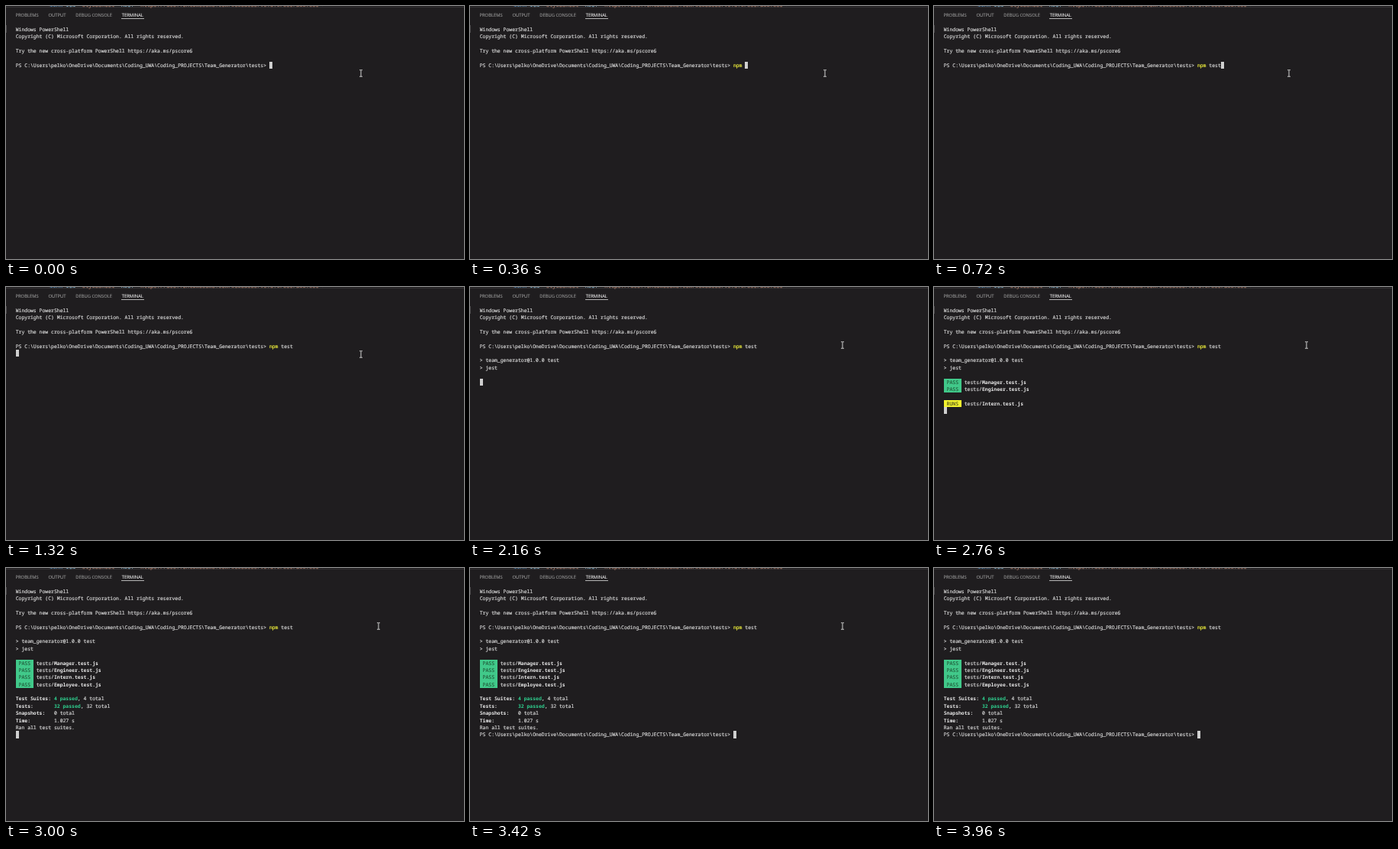
Write an HTML page that moves like this. It is 600 by 331 pixels and loops after 4200 ms.

```html
<!DOCTYPE html>
<html lang="en">
<head>
<meta charset="utf-8">
<title>Terminal test run</title>
<style>
  html, body { margin: 0; width: 100%; height: 100%; overflow: hidden; background: #1f1d1f; }
  #stage { position: relative; width: 600px; height: 331px; overflow: hidden; text-rendering: geometricPrecision; }
  #stage > * { position: absolute; }
  pre {
    margin: 0; color: #d2d2d2; white-space: pre;
    font: 6.443px/9.375px "Noto Sans Mono", monospace; font-variant-ligatures: none;
    -webkit-text-stroke: .2px;
  }
  #code { left: 53px; top: -5.4px; color: #808080; font-size: 7.08px; opacity: .75; }
  #code i { font-style: normal; color: #9cdcfe; }
  #code b { font-weight: 400; color: #569cd6; }
  #code s { text-decoration: none; color: #ce9178; }
  #border { left: 0; top: 1px; width: 600px; height: 1px; background: #333133; }
  #mark { left: 0; top: 25px; width: 1px; height: 10px; background: #4a484a; }
  .tab {
    top: 7px; color: #969696; font: 5.83px/10px "Open Sans", sans-serif; white-space: nowrap;
    -webkit-text-stroke: .12px;
  }
  .on { color: #e7e7e7; }
  #line { left: 151px; top: 16px; width: 30px; height: 1px; background: #b4b4b4; }
  #term { left: 12.7px; top: 25.8px; }
  #term b { color: #e8e8e8; -webkit-text-stroke: 0; }
  #term .ok { color: #2fd08f; }
  .cmd { color: #f0f03c; }
  .pass, .runs, .cur { display: inline-block; height: 9.375px; vertical-align: top; }
  .pass { background: #41c98a; color: #23613f; }
  .runs { background: #f2f22e; color: #55551c; }
  .cur { width: 1ch; background: #cfcfcf; }
  #mouse { width: 6px; height: 10px; margin: -5px 0 0 -3px; }
</style>
</head>
<body>
<div id="stage">
  <div id="border"></div>
  <pre id="code">&lt;<b>link</b> <i>rel</i>=<s>"stylesheet"</s> <i>href</i>=<s>"https://use.fontawesome.com/releases/v5.8.1/css/all.css"</s>&gt;</pre>
  <div id="mark"></div>
  <div class="tab" style="left:12.5px">PROBLEMS</div>
  <div class="tab" style="left:55.5px">OUTPUT</div>
  <div class="tab" style="left:91.2px">DEBUG CONSOLE</div>
  <div class="tab on" style="left:151.8px">TERMINAL</div>
  <div id="line"></div>
  <pre id="term"></pre>
  <svg id="mouse" viewBox="0 0 6 10" fill="none" stroke="#c4c4c4" stroke-width="1.1"><path d="M1 .8H2.4L3 1.3L3.6 .8H5M3 1V9M1 9.2H2.4L3 8.7L3.6 9.2H5"/></svg>
</div>
<script>
const LOOP = 4200, STEP = 60;
const term = document.getElementById('term');
const mouse = document.getElementById('mouse');

const span = (cls, text) => `<span class="${cls}">${text}</span>`;
const bold = text => `<b>${text}</b>`;
const ok = text => `<b class="ok">${text}</b>`;
const test = (cls, name) =>
  `${span(cls, ` ${cls.toUpperCase()} `)} tests/${bold(name + '.test.js')}\n`;

const COMMAND = 'npm test';
const SUITES = ['Manager', 'Engineer', 'Intern', 'Employee'];
const INTRO = 'Windows PowerShell\n' +
  'Copyright (C) Microsoft Corporation. All rights reserved.\n\n' +
  'Try the new cross-platform PowerShell https://aka.ms/pscore6\n\n';
const PROMPT = 'PS C:\\Users\\pelko\\OneDrive\\Documents\\Coding_UWA\\Coding_PROJECTS\\Team_Generator\\tests&gt; ';
const SUMMARY = `
${bold('Test Suites:')} ${ok('4 passed')}, 4 total
${bold('Tests:')}       ${ok('32 passed')}, 32 total
${bold('Snapshots:')}   0 total
${bold('Time:')}        1.027 s
Ran all test suites.
`;

// Number of suites finished at time t
const passed = t => t < 2640 ? 0 : t < 2700 ? 1 : t < 2880 ? 2 : t < 2940 ? 3 : 4;

function screen(t) {
  const typed = COMMAND.slice(0, Math.max(0, Math.floor((t - 60) / 84) + 1));
  let out = INTRO + PROMPT + span('cmd', typed.slice(0, 3)) + typed.slice(3);
  if (t >= 900) out += '\n';
  if (t >= 1440) out += '\n&gt; team_generator@1.0.0 test\n&gt; jest\n\n';
  if (t >= 2340) {
    const done = passed(t);
    out += SUITES.slice(0, done).map(name => test('pass', name)).join('');
    out += done < 4 ? '\n' + test('runs', SUITES[done]) : SUMMARY;
  }
  if (t >= 3060) out += PROMPT;
  return out + span('cur', '');
}

const ramp = (t, from, to) => Math.min(1, Math.max(0, (t - from) / (to - from)));

function moveMouse(t) {
  const a = ramp(t, 1320, 1560), shift = a * a * (3 - 2 * a);
  const exit = ramp(t, 3720, 3900) ** 1.5;
  mouse.style.left = 465 + 23 * shift - 8 * exit + 'px';
  mouse.style.top = 88 - 12 * shift + 234 * exit + 'px';
  mouse.style.visibility = t < 3960 ? 'visible' : 'hidden';
}

let shown = '';
function draw(now) {
  const t = Math.floor((now % LOOP) / STEP) * STEP;
  const html = screen(t);
  if (html !== shown) term.innerHTML = shown = html;
  moveMouse(t);
}

const start = performance.now();
function tick() {
  draw(performance.now() - start);
  requestAnimationFrame(tick);
}
tick();
</script>
</body>
</html>
```
